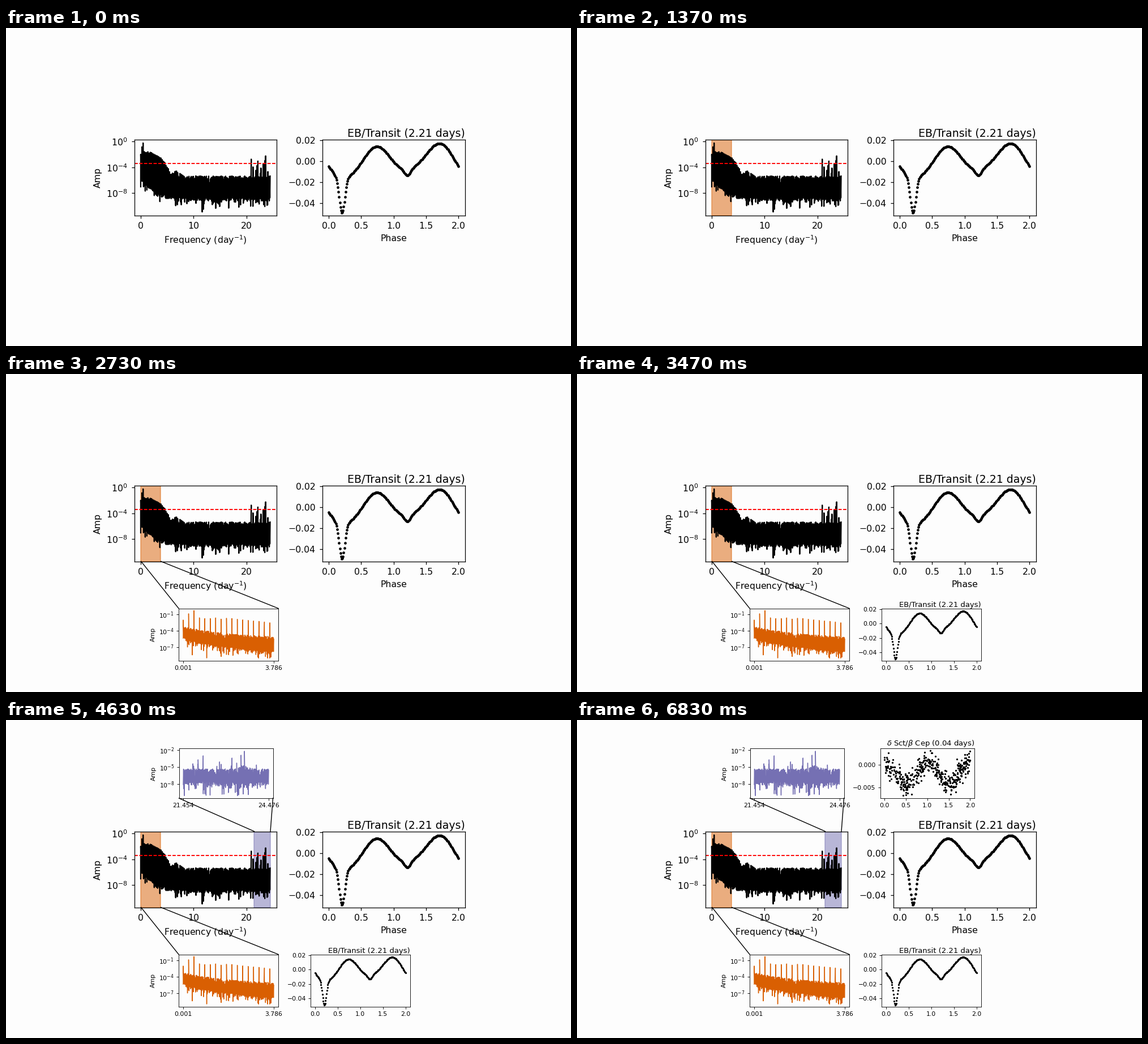
A matplotlib script that plays this animation: 998 by 561 pixels, repeating every 6.86 s.

```python
import numpy as np
import matplotlib.pyplot as plt
from matplotlib.animation import FuncAnimation
from matplotlib.lines import Line2D

W, H = 998, 561
FRAMES, INTERVAL = 140, 49
STAGE_FRAMES = 56 / 3
BIG, SMALL = 1.13, 0.784   # text and line scale of main and zoomed panels
BACK = "#fdfdfd"
ORANGE, PURPLE = "#d95f02", "#7570b3"
ALL_FREQ, LOW_BAND, HIGH_BAND = (0.001, 24.476), (0.001, 3.786), (21.454, 24.476)

plt.rcParams["font.family"] = "DejaVu Sans"
rng = np.random.default_rng(7)
fig = plt.figure(figsize=(W / 100, H / 100), dpi=100, facecolor=BACK)


def panel(x0, y0, x1, y1, scale, xlim, ylim):
    """Axes placed by pixel corners, counted from the top left."""
    ax = fig.add_axes([x0 / W, 1 - y1 / H, (x1 - x0) / W, (y1 - y0) / H],
                      facecolor=BACK)
    margin = 0.05 * (xlim[1] - xlim[0])
    ax.set_xlim(xlim[0] - margin, xlim[1] + margin)
    ax.set_ylim(*ylim)
    ax.tick_params(labelsize=10 * scale, length=3.5 * scale,
                   pad=4 * scale, width=0.8 * scale)
    for spine in ax.spines.values():
        spine.set_linewidth(0.8 * scale)
    return ax


def label_amp(ax, exponents, scale):
    ax.set_yticks(exponents,
                  [rf"$\mathdefault{{10^{{{e}}}}}$" for e in exponents])
    ax.set_ylabel("Amp", fontsize=10 * scale, labelpad=4.4 * scale)


def label_x(ax, text):
    ax.set_xlabel(text, fontsize=10 * BIG, labelpad=4 * BIG)


def title(ax, text, scale):
    ax.set_title(text, loc="right", fontsize=12 * scale, pad=2 * scale)


def connector(x0, y0, x1, y1):
    line = Line2D([x0 / W, x1 / W], [1 - y0 / H, 1 - y1 / H], color="k",
                  lw=1, transform=fig.transFigure)
    return fig.add_artist(line)


def bump(x, center, width):
    return np.exp(-0.5 * ((x - center) / width) ** 2)


# Frequency spectrum, in log10 of the amplitude
def noise_top(f):
    return (-5.45 + 2.2 * np.exp(-f / 2) + 0.7 * bump(f, 6.7, 0.6)
            + 0.6 * bump(f, 23.6, 0.15))


def noise_floor(f):
    return -8.7 + 3.2 * np.exp(-f / 2.5)


def spectral_peaks():
    """Orbital harmonics, strong pulsations and a few weak ones."""
    k = np.arange(1, 26)
    harmonics = -1.65 - 1.7 * (k / 20) ** 3 + rng.uniform(-0.12, 0.12, k.size)
    harmonics[:2] = -0.85, -0.25
    pulse_f = [20.9, 21.98, 22.16, 23.18, 23.5, 23.62]
    pulse_amp = [-2.75, -3.75, -3.05, -3.45, -2.95, -2.25]
    weak_f = rng.uniform(21.2, 24.3, 11)
    weak_amp = -4.9 + rng.exponential(0.25, 11)
    return (np.concatenate([[0.001], k / 4.42, pulse_f, weak_f]),
            np.concatenate([[-2], harmonics, pulse_amp, weak_amp]))


peak_f, peak_amp = spectral_peaks()


def spectrum(limits, n, lift, tail, lowest):
    """Zigzag between a noisy upper and a ragged lower edge, plus peaks."""
    f = np.linspace(*limits, n)
    upper = noise_top(f) + 0.1 - rng.exponential(0.3, n)
    lower = noise_floor(f) + lift - rng.exponential(tail, n)
    amp = np.where(np.arange(n) % 2, upper, np.maximum(lower, lowest))
    inside = (peak_f >= limits[0]) & (peak_f <= limits[1])
    f = np.concatenate([f, peak_f[inside]])
    amp = np.concatenate([amp, peak_amp[inside]])
    rank = np.argsort(f)
    return f[rank], amp[rank]


# Folded light curves
def eclipse_curve(n=200):
    phase = np.linspace(0, 2, n)
    turn = np.pi * phase
    flux = (0.9 + 13.5 * np.cos(2 * (turn - 0.72 * np.pi))
            - 4.4 * np.cos(turn - 0.335 * np.pi) - np.cos(4 * turn)
            - 33.5 * bump(phase, 0.205, 0.042)
            - 6 * bump(phase, 1.215, 0.045))
    return phase, flux / 1000


def pulsation_curve(n=420):
    phase = rng.uniform(0, 2, n)
    flux = -0.0018 + 0.0023 * np.cos(2 * np.pi * phase)
    flux += rng.normal(0, 0.0012, n)
    return phase, np.clip(flux, -0.0067, 0.003)


def fold_panel(box, scale, ylim, yticks, curve, text):
    ax = panel(*box, scale, (0, 2), ylim)
    ax.plot(*curve, "k.", ms=6 * scale, mew=0)
    ax.set_xticks(np.arange(0, 2.5, 0.5))
    ax.set_yticks(yticks)
    title(ax, text, scale)
    return ax


def eclipse_panel(box, scale):
    return fold_panel(box, scale, (-0.0517, 0.0208), [0.02, 0, -0.02, -0.04],
                      eclipse_curve(), "EB/Transit (2.21 days)")


# Main panels
spec = panel(226.5, 196.5, 478, 330.5, BIG, ALL_FREQ, (-11.43, 0.31))
spec.plot(*spectrum(ALL_FREQ, 460, 0, 0.45, -10.9), "k", lw=1.4 * BIG)
spec.axhline(-3.37, color="r", ls=(0, (3.1, 1.35)), lw=1.2 * BIG)
spec.set_xticks([0, 10, 20])
label_x(spec, "Frequency (day$^{-1}$)")
label_amp(spec, [0, -4, -8], BIG)
fold = eclipse_panel((558.5, 196.5, 810.5, 330.5), BIG)
label_x(fold, "Phase")


# Highlighted bands and their zooms
def band(limits, color):
    return spec.axvspan(*limits, color=color, alpha=0.5, lw=BIG, zorder=1)


def zoom_panel(box, limits, ylim, exponents, data, color):
    ax = panel(*box, SMALL, limits, ylim)
    ax.plot(*data, color=color, lw=1.3 * SMALL)
    ax.set_xticks(limits, [f"{v:.3f}" for v in limits])
    label_amp(ax, exponents, SMALL)
    return ax


low_band = band(LOW_BAND, ORANGE)
low_zoom = zoom_panel((305, 413.5, 481, 506), LOW_BAND, (-9.5, 0.13),
                      [-1, -4, -7], spectrum(LOW_BAND, 340, 0.3, 0.45, -9),
                      ORANGE)
low_lines = [connector(238.5, 330.5, 305, 413.5),
             connector(273.5, 330.5, 481, 413.5)]
low_fold = eclipse_panel((538, 413.5, 713.5, 506), SMALL)

high_band = band(HIGH_BAND, PURPLE)
high_zoom = zoom_panel((305.5, 50, 471.5, 138), HIGH_BAND, (-10.55, -1.75),
                       [-2, -5, -8], spectrum(HIGH_BAND, 300, 1.1, 0.6, -10.1),
                       PURPLE)
high_lines = [connector(305.5, 138, 438.5, 196.5),
              connector(471.5, 138, 467, 196.5)]
high_fold = fold_panel((535.5, 50, 702, 138), SMALL, (-0.00726, 0.00348),
                       [0, -0.005], pulsation_curve(),
                       r"$\delta$ Sct/$\beta$ Cep (0.04 days)")

# Each group appears at its stage and stays until the loop ends
groups = [[low_band], [low_zoom, *low_lines], [low_fold],
          [high_band], [high_zoom, *high_lines], [high_fold]]


def update(frame):
    stage = int((frame + 0.5) / STAGE_FRAMES)
    for start, group in enumerate(groups, 1):
        for artist in group:
            artist.set_visible(stage >= start)
    return []


anim = FuncAnimation(fig, update, frames=FRAMES, interval=INTERVAL,
                     repeat=True, repeat_delay=0, blit=False)
plt.show()
```
